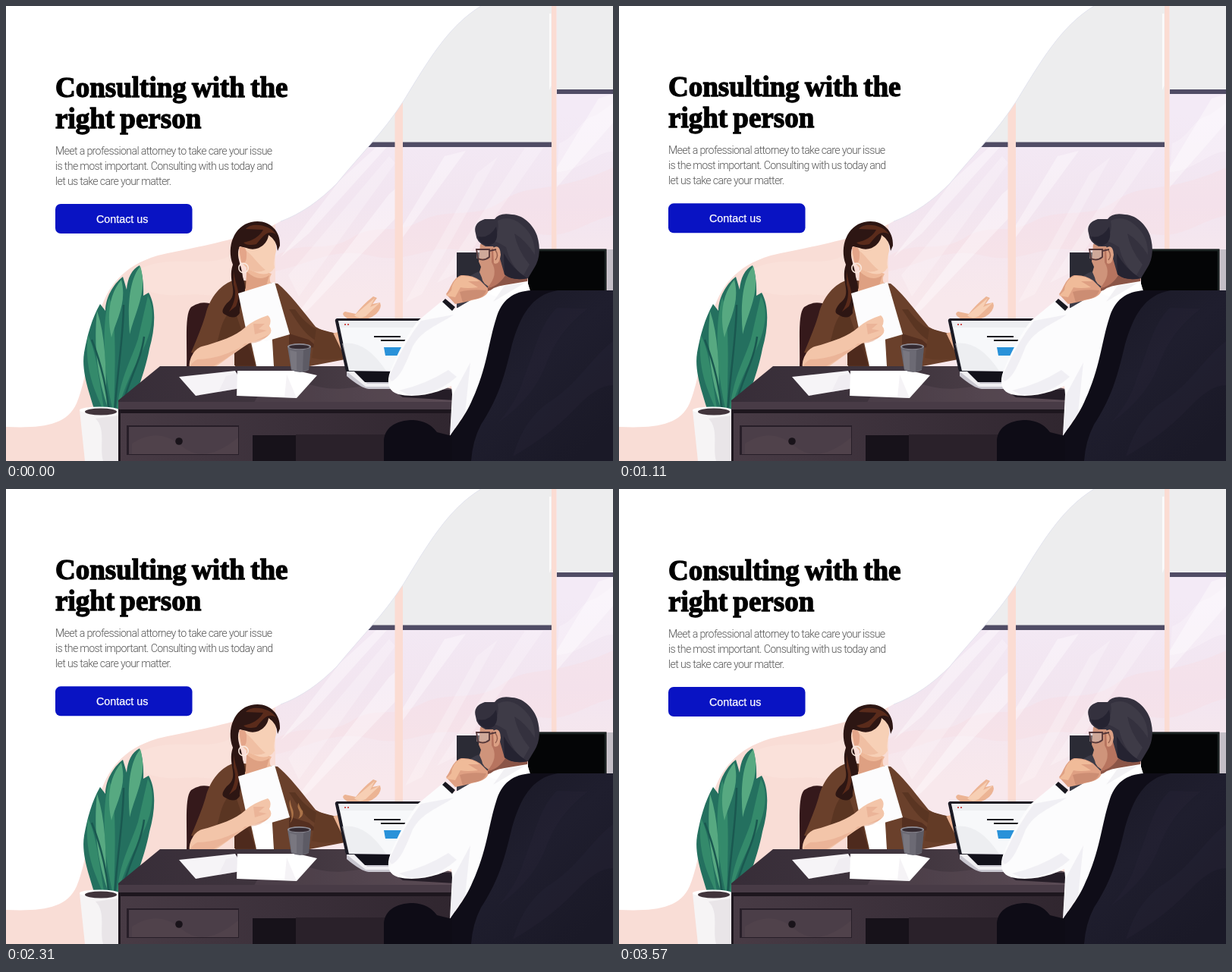
These frames come from a looping animation (800x600 px, 3.6 s). An HTML page:

```html
<!DOCTYPE html>
<html lang="en">
<head>
<meta charset="utf-8">
<title>Consulting</title>
<style>
html, body { margin: 0; width: 100%; height: 100%; overflow: hidden; background: #fff; }
svg { display: block; width: 800px; height: 600px; }
.title { font: bold 37px "Liberation Serif", serif; word-spacing: -2px; stroke: #000; stroke-width: 1.3px; }
.body { font: 300 14.2px Roboto, "Liberation Sans", sans-serif; letter-spacing: -.66px; fill: #555; }
.label { font: 14.3px "Liberation Sans", sans-serif; fill: #fff; stroke: #fff; stroke-width: .25px; }
</style>
</head>
<body>
<svg viewBox="0 0 800 600">
  <defs>
    <linearGradient id="sky" x2="0" y2="1">
      <stop offset=".3" stop-color="#f3eaf6"/>
      <stop offset=".55" stop-color="#f2e5f0"/>
      <stop offset=".8" stop-color="#f8e8ec"/>
    </linearGradient>
    <linearGradient id="top">
      <stop stop-color="#372d38"/><stop offset=".55" stop-color="#41363f"/><stop offset="1" stop-color="#54464f"/>
    </linearGradient>
    <linearGradient id="front">
      <stop stop-color="#483b45"/><stop offset=".5" stop-color="#3b303a"/><stop offset="1" stop-color="#30262f"/>
    </linearGradient>
    <linearGradient id="chair" x2=".7" y2="1">
      <stop stop-color="#1a1926"/><stop offset=".5" stop-color="#1f1e2e"/><stop offset="1" stop-color="#1a1927"/>
    </linearGradient>
    <clipPath id="blob">
      <path d="M626 0C582 27 556 73 524 125C498 166 466 197 436 234C413 257 389 274 362 284C325 305 250 318 200 329C153 343 133 371 122 408C109 456 105 495 93 524C80 553 48 557 0 555V600H800V0Z"/>
    </clipPath>
    <clipPath id="glass"><path d="M355 186H513V480H355ZM522 186H719V420H522ZM726 116H800V325H726Z"/></clipPath>
  </defs>

  <g clip-path="url(#blob)">
    <path fill="#f9ddd6" d="M0 0H800V600H0Z"/>
    <path fill="#fae5df" d="M172 349C220 323 270 350 300 326V390C260 370 218 391 184 374Z" opacity=".4"/>
    <path fill="url(#sky)" d="M355 0H800V480H355Z"/>
    <g clip-path="url(#glass)">
      <path fill="#f5d9df" opacity=".35" d="M355 330C394 306 420 329 458 304C490 286 512 303 548 283C586 264 621 284 659 254C693 233 720 249 800 213V276C762 285 742 307 704 301C658 298 641 332 594 321C549 316 528 343 475 328C430 319 400 340 355 350Z"/>
      <path fill="#fff" opacity=".35" d="M440 230L488 186H502L399 300L362 331ZM505 248L518 237V275L399 400L377 415ZM578 198L606 191L523 305V289ZM781 122L800 116V154L726 239V213Z"/>
      <path fill="#fff" opacity=".22" d="M372 355L505 198L513 207L386 383ZM621 220L648 199L548 380L526 391ZM684 187H708L592 353L568 365ZM729 181C752 174 756 148 778 144L800 128V192C780 190 758 218 726 219Z"/>
    </g>
    <path fill="#ededee" d="M400 0H719V180H400ZM726 0H800V110H726Z"/>
    <path fill="#504c65" d="M400 179.5H719V186H400ZM726 110H800V116H726Z"/>
    <path fill="#fbdcd3" d="M512.5 0H523V480H512.5ZM719 0H725.5V335H719Z"/>
    <path fill="#fff" opacity=".8" d="M716 10H718.5V105L716 111Z"/>
  </g>
  <path fill="none" stroke="#dfe3ef" stroke-width=".8" d="M626 0C582 27 556 73 524 125C498 166 466 197 436 234C413 257 389 274 362 284"/>

  <g id="plant">
    <path fill="#24705f" d="M119 541C109 508 99 481 103 457C107 435 113 412 124 393L131 402C131 385 141 367 154 357L159 374C160 359 166 347 176 342Q182 358 181 382L188 378C198 395 197 424 189 452C184 478 174 509 158 541Z"/>
    <path fill="#348a6b" d="M108 434C119 455 122 488 130 537C115 505 103 475 108 434ZM136 384C146 412 144 469 142 538C129 488 125 423 136 384ZM187 382C201 409 187 441 174 467C161 491 155 509 146 535C149 493 165 467 174 439Z"/>
    <path fill="#57a981" d="M177 343C187 376 171 401 163 433C160 397 162 361 177 343ZM152 361C160 391 145 415 139 437C132 407 137 378 152 361ZM120 402C133 441 131 486 133 527C121 489 115 450 120 402Z"/>
    <path fill="none" stroke="#1a5850" stroke-width="2.5" d="M113 440C128 478 132 506 137 539M155 394C155 434 146 488 143 538M182 436C178 470 158 498 151 538"/>
    <path fill="#f6f4f5" d="M97 533Q123 526 149 533V600H104Z"/>
    <ellipse cx="123" cy="533" rx="26" ry="4.5" fill="#fff"/>
    <ellipse cx="125" cy="535" rx="21" ry="4.5" fill="#41343b"/>
    <path fill="#dfd9df" opacity=".55" d="M118 544C132 558 123 580 128 600H148V540Z"/>
  </g>

  <g id="woman">
    <path fill="#35191b" d="M238 476C239 447 235 406 244 397Q255 389 268 392L268 476Z"/>
    <path fill="#6a402b" d="M302 361C284 366 269 383 263 407C258 424 251 440 244 457L282 464L302 449V475H400L447 466V433C430 431 419 430 408 423C391 402 374 379 358 366Z"/>
    <path fill="#5a3522" d="M300 397C276 421 286 440 270 456L301 451V474H331L315 441ZM373 400C387 420 397 444 433 450L430 432C407 429 394 418 381 400Z"/>
    <path fill="#47241a" d="M299 434L318 425L328 475H302ZM373 432L399 440L412 451L373 448Z" opacity=".6"/>
    <path fill="#fff" d="M311 389L347 376L353 475H330Z"/>
    <path fill="#eeb899" d="M317 343L350 353Q344 362 353 371L345 393L315 405Q308 386 317 370Z"/>
    <path fill="#dea082" d="M317 350Q333 365 347 355L342 372Q327 376 315 390Z"/>
    <path fill="#f7d0b6" d="M306 327C310 309 328 301 344 299Q357 304 356 323Q352 338 354 345Q346 359 326 350Q310 344 306 327Z"/>
    <path fill="#f0bfa3" d="M307 325C316 313 325 334 342 348Q324 356 312 339Z"/>
    <path fill="#2d1613" d="M299 341C290 317 301 290 323 285C343 280 362 293 361 316L358 323Q357 309 346 302C345 314 331 325 317 319L308 317C302 330 311 342 312 357C321 385 307 387 308 405Q302 415 289 407Q281 404 291 392C309 379 291 364 299 341Z"/>
    <path fill="#5a2b1b" d="M316 294C324 284 349 289 356 301C345 295 340 302 330 314C321 316 316 315 313 312Q332 308 339 295ZM300 350C303 372 311 378 303 396L294 403Q306 384 300 367Z"/>
    <path fill="#e4a589" d="M307 318Q318 316 317 329Q317 342 310 338Z"/>
    <circle cx="313" cy="345.5" r="6.2" fill="none" stroke="#fae9df" stroke-width="1.5"/>
    <path fill="#fcfcfd" d="M306 379L354 364L374 433L343 442L317 430Z"/>
    <path fill="#f3c5a9" d="M258 449C281 443 303 435 315 424Q326 414 345 408Q351 413 347 422Q354 431 341 438L320 445C293 462 273 481 255 487Q236 482 244 463Q249 452 258 449Z"/>
    <path fill="#e6ab8e" d="M262 481Q296 464 315 445Q334 447 347 433L326 443C307 449 289 465 252 466Q242 471 243 479Q250 488 262 481ZM326 419L341 419L333 426L344 428L328 433Z" opacity=".6"/>
    <path fill="#ecb494" d="M430 432L441 429L449 440V456L444 460ZM450 412Q440 406 447 403L461 406Q470 394 484 383L489 385L483 393L493 391Q496 398 488 406Q479 414 463 414Z"/>
    <path fill="#f7cfb4" d="M459 408L486 385L480 397L493 391L474 409Q465 414 459 408Z"/>
    <path fill="#633b26" d="M409 425L431 431L447 464Q422 469 403 464Z"/>
  </g>

  <g id="desk">
    <path fill="url(#top)" d="M203 475H470L592 506V532H148V520Z"/>
    <path fill="#6f5e69" opacity=".25" d="M343 495C406 488 403 514 470 501L592 508V526H325Z"/>
    <path fill="#251d27" d="M508 506H592V520L523 516Z"/>
    <path fill="#483b46" d="M148 522H592V533H148Z"/>
    <path fill="url(#front)" d="M148 532H592V600H148Z"/>
    <path fill="#1d161e" d="M148 532H592V537H148ZM148 532H151V600H148Z"/>
    <path fill="#271e28" d="M159 553H307V592H159Z"/>
    <path fill="#4b3e48" d="M162 555H306V591H162Z"/>
    <path fill="#57474f" opacity=".5" d="M166 577Q200 554 231 580T306 569V591H166Z"/>
    <circle cx="228" cy="574" r="4.8" fill="#19131a"/>
    <path fill="#17121a" d="M325 566H382V600H325Z"/>
    <path fill="#2a212a" d="M382 565H510V600H382Z"/>
    <path fill="#f6f4f7" d="M228 489L302 481L315 503L250 514Z"/>
    <path fill="#fff" d="M305 481L384 481L410 487L383 517L304 514Z"/>
    <path fill="#e6e2e9" d="M290 488L305 484L304 505L280 509ZM370 486L383 517L367 516Z" opacity=".4"/>
  </g>

  <g id="cup">
    <path fill="#6c6a74" d="M371 449H402L399 480Q388 486 376 480Z"/>
    <path fill="#85838c" d="M374 454L383 456V481L376 479Z" opacity=".5"/>
    <path fill="#4e4b56" d="M392 454L402 450L399 479L391 482Z" opacity=".5"/>
    <ellipse cx="386.5" cy="449" rx="15.5" ry="4" fill="#8f8c95"/>
    <ellipse cx="386.5" cy="449.5" rx="13.5" ry="2.8" fill="#342a31"/>
  </g>
  <g id="steam" fill="#e9a365">
    <path d="M374 440Q378 433 375 423Q372 415 374 409Q375 416 378 423Q380 432 374 440Z"/>
    <path d="M385 434Q389 428 386 423Q383 418 385 413Q388 421 391 424Q392 431 385 434Z"/>
  </g>

  <g id="laptop">
    <path fill="#1b1a24" d="M436 412H560L525 484H451Q448 483 447 478L434 416Q433 413 436 412Z"/>
    <path fill="#f7f8fa" d="M438 415H558L523 481H452Z"/>
    <path fill="#e6e8ec" d="M438 415H558L553 424H440ZM443 445Q474 440 501 481H452Z" opacity=".55"/>
    <path fill="#d05050" d="M446 419h2v2h-2zM450 419h2v2h-2z"/>
    <path stroke="#191820" stroke-width="2" d="M485 436H520M494 441H532"/>
    <path fill="#2992d9" d="M498 450H530V461H500Z"/>
    <path fill="#c9c7d0" d="M449 482L507 481V505H478Q468 504 449 488Z"/>
    <path fill="#f1f0f3" d="M449 482L462 482L476 498H507V502H474Z"/>
    <path fill="#12111a" d="M459 482H506V496H473Z"/>
  </g>

  <g id="man">
    <path fill="#3c3b47" d="M594 325H650V398H594Z"/>
    <path fill="#2b2b35" d="M594 325H650V353Q624 338 594 372Z"/>
    <path fill="#040506" d="M688 320.5H791.5V377H688Z"/>
    <path fill="none" stroke="#1b2322" stroke-width="2.5" d="M697 322H790V376"/>
    <path fill="#c3bec6" d="M792.5 321H800V376H792.5Z"/>
    <path fill="#fcfcfd" d="M636 374L687 363L692 379L664 392L640 460L612 528L585 567L588 512L587 501C565 512 538 517 517 512Q500 507 505 486C511 470 524 439 543 415L577 387L590 401Z"/>
    <path fill="#e6e4eb" d="M590 407C570 421 549 426 536 449C525 477 518 491 508 495L505 489Q524 445 547 415ZM518 507Q553 499 583 480L594 489Q568 513 531 513ZM612 470L589 513L585 567L605 537Z" opacity=".5"/>
    <path fill="#18171f" d="M579 386L592 397L588 402L575 390Z"/>
    <path fill="#dfa083" d="M580 380C586 373 588 359 600 355Q614 354 625 362L636 373Q636 382 622 386L602 391L592 393Z"/>
    <path fill="#f0bb99" d="M587 375Q588 361 600 356Q615 355 624 363L609 363L622 371Q607 373 599 371L592 384L580 382Z"/>
    <path fill="#c0806a" d="M598 377Q613 373 633 375Q630 386 614 387L602 391Z" opacity=".6"/>
    <path fill="#8b5547" d="M635 353L663 341L688 355L687 364L654 370L635 376Z"/>
    <path fill="#cf947b" d="M625 314L650 312L660 348Q653 360 639 371Q628 367 627 358L624 351L626 344L623 337Z"/>
    <path fill="#b7745f" d="M640 338Q650 354 634 372Q650 370 660 352L652 319L640 320Z"/>
    <path fill="#34313e" d="M619 300Q615 286 631 281L644 281Q650 272 667 275C684 276 696 291 700 303Q707 327 697 344L688 359Q670 363 657 354L651 333L642 317H632Q620 312 619 300Z"/>
    <path fill="#45414d" d="M648 283Q664 275 679 288Q698 303 697 328Q684 308 670 300Q674 322 690 341L681 357Q664 340 659 318Q645 308 634 310Q652 304 648 283Z" opacity=".6"/>
    <path fill="#252331" d="M622 304Q637 307 646 291Q651 313 636 316Q624 314 622 304ZM656 326Q666 345 687 359Q668 363 657 354Z"/>
    <path fill="#dca084" d="M642 319Q651 313 652 328Q650 343 643 339Z"/>
    <path fill="none" stroke="#96604f" stroke-width="1.4" d="M645 322Q650 329 645 335"/>
    <path fill="#cfc0bf" opacity=".45" d="M620 322H636V333H620Z"/>
    <path fill="none" stroke="#55383a" stroke-width="1.8" d="M620 321H637V331Q630 337 622 333ZM637 323L646 321"/>
    <path fill="#fff" d="M635 379Q641 370 657 368L687 363L691 378L658 388Z"/>
    <path fill="#e6e3ea" d="M657 369L684 365L642 390Z" opacity=".5"/>
  </g>

  <g id="armchair">
    <path fill="#0f0d18" d="M800 375H693C668 376 653 388 646 412C636 443 634 477 615 518C604 545 586 562 582 574V600H800Z"/>
    <path fill="url(#chair)" d="M800 375H727C692 381 678 409 667 446C657 488 650 515 626 552Q615 573 613 600H800Z"/>
    <path fill="#28263a" opacity=".3" d="M726 398C702 421 696 459 682 491Q674 521 648 550Q696 516 712 472T767 399ZM800 442C770 465 754 498 716 522Q682 545 668 594Q718 565 749 532T800 500Z"/>
    <path fill="#0e0c16" d="M498 600V572C500 554 516 546 537 546Q557 547 568 562L588 567V600Z"/>
  </g>

  <g id="copy">
    <g class="title">
      <text x="65" y="120">Consulting with the</text>
      <text x="65" y="161">right person</text>
    </g>
    <g class="body">
      <text x="65" y="196">Meet a professional attorney to take care your issue</text>
      <text x="65" y="216">is the most important. Consulting with us today and</text>
      <text x="65" y="236">let us take care your matter.</text>
    </g>
    <rect x="65" y="261" width="180.5" height="39" rx="7" fill="#0913c3"/>
    <text class="label" x="119" y="286">Contact us</text>
  </g>
</svg>
<script>
const copy = document.getElementById('copy');
const steam = document.getElementById('steam');
const LOOP = 3600, BOB = 1200, PUFF = 900;

function draw(now) {
  const t = now % LOOP;
  const lift = 6 * (1 - Math.cos(t / BOB * 2 * Math.PI));
  copy.setAttribute('transform', `translate(0 ${-lift})`);

  // Each puff rises from the cup, drifts right and fades.
  const p = (t % PUFF - 380) / 320;
  const visible = p > 0 && p < 1;
  steam.setAttribute('opacity', visible ? Math.sin(p * Math.PI) * .55 : 0);
  steam.setAttribute('transform', `translate(${8 * p - 3} ${4 - 8 * p})`);
  requestAnimationFrame(draw);
}
requestAnimationFrame(draw);
</script>
</body>
</html>
```
